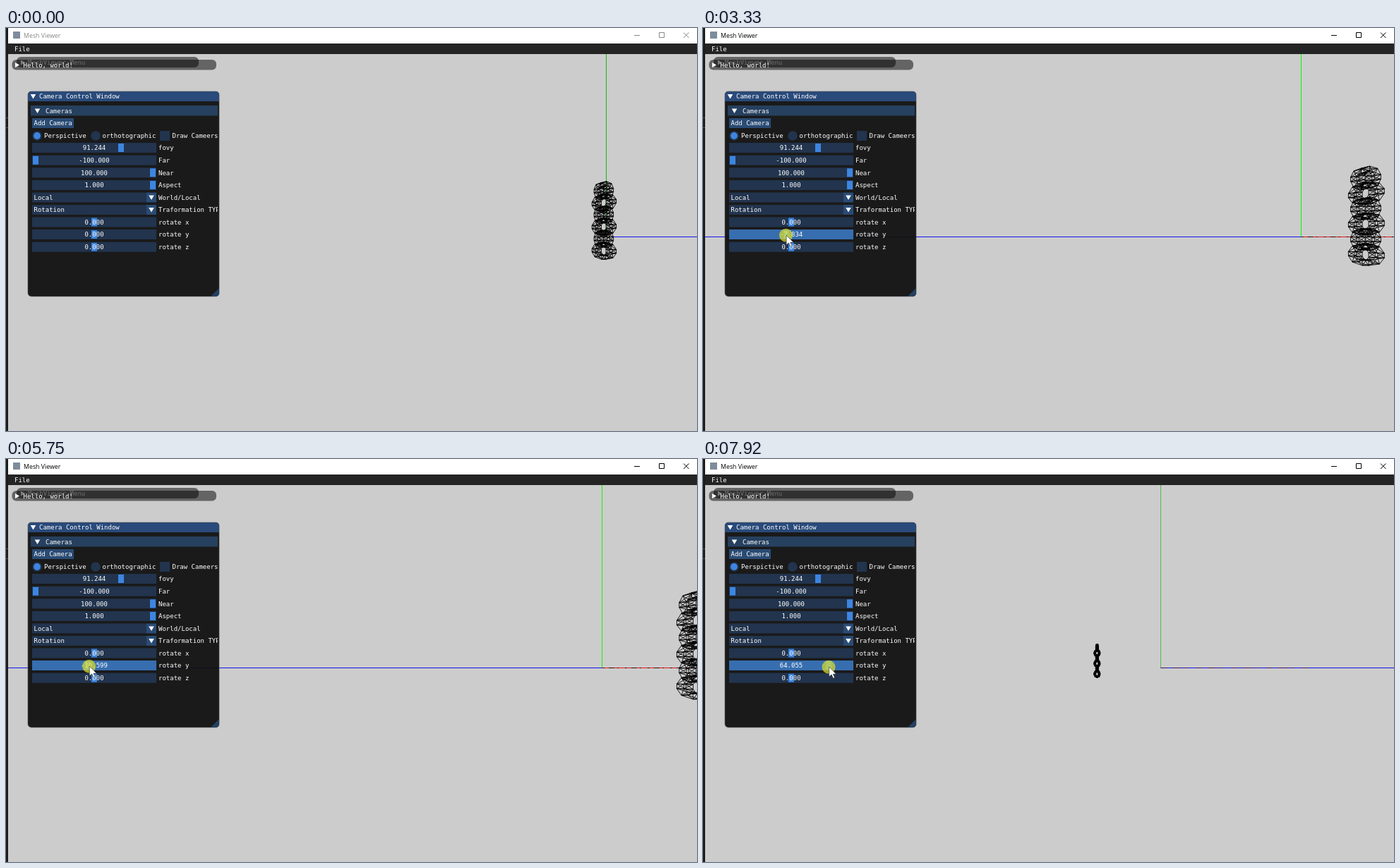
Recreate the animation shown at these times as an HTML page. Size 979 px wide and 572 px high, loop 8 s.

```html
<!DOCTYPE html>
<html lang="en">
<head>
<meta charset="utf-8">
<title>Mesh Viewer</title>
<style>
html, body { margin: 0; height: 100%; overflow: hidden; background: #ccc; }
svg { display: block; width: 979px; height: 572px; }
text { font: 9px "DejaVu Sans Mono", monospace; fill: #fff; }
#title { font: 8.8px "Open Sans", sans-serif; fill: #888; }
#buttons { fill: none; stroke: #888; }
.focus #title { fill: #000; }
.focus #buttons { stroke: #000; }
.mid { text-anchor: middle; }
</style>
</head>
<body>
<svg id="stage" viewBox="0 0 979 572">
  <defs><clipPath id="panel"><rect x="31" y="90" width="269" height="291"/></clipPath></defs>
  <rect width="979" height="572" fill="#ccc"/>
  <g id="scene" fill="none">
    <path id="green"/>
    <path id="blue" stroke="#1414f5"/>
    <path id="red" stroke="#f01414"/>
    <path id="mix"/>
    <path id="mesh" stroke="#000" stroke-width=".9"/>
  </g>
  <rect width="979" height="22" fill="#fff"/>
  <rect y="22" width="979" height="15" fill="#242424"/>
  <rect width="3" height="572" fill="#1c1c1c"/>
  <path d="M0 127.5H3M0 141.5H3" stroke="#555"/>
  <rect x="10" y="5" width="10" height="10" fill="#7f8c9c"/>
  <text id="title" x="25" y="13.5">Mesh Viewer</text>
  <path id="buttons" d="M890 10.5H898M925.5 6.5H932.5V13.5H925.5ZM960 6.5L967.5 14M967.5 6.5L960 14"/>
  <g id="ui"></g>
  <circle id="press" r="9.5" fill="#d8dc28" fill-opacity=".72"/>
  <path id="cursor" d="M0 0V14L3.4 11L5.8 16.2L8 15.2L5.7 10.3H10Z" fill="#fff" stroke="#222" stroke-width=".6"/>
</svg>
<script>
const $ = id => document.getElementById(id);
const FRAME = '#22344e', BUTTON = '#2a4b74', GRAB = '#3d85e0';

// ---- interface ----
let ui = '';
const rect = (x, y, w, h, fill, more = '') =>
  ui += `<rect x="${x}" y="${y}" width="${w}" height="${h}" fill="${fill}" ${more}/>`;
const text = (x, y, s, more = '') => ui += `<text x="${x}" y="${y + 3.2}" ${more}>${s}</text>`;
const path = (d, fill = '#fff') => ui += `<path d="${d}" fill="${fill}"/>`;
const down = (x, y) => path(`M${x - 3.8} ${y - 3}h7.6l-3.8 6.5z`);
const right = (x, y) => path(`M${x - 3} ${y - 3.5}v7l6 -3.5z`);
const label = (y, s) => text(216, y, s, 'clip-path="url(#panel)"');

function slider(y, value, grab, name, id = '') {
  rect(37, y - 7, 176, 14, FRAME, id && `id="${id}Frame"`);
  rect(grab - 4, y - 6, 8, 12, GRAB, id && `id="${id}Grab"`);
  text(125, y, value, `class="mid" ${id && `id="${id}Value"`}`);
  label(y, name);
}
function combo(y, value, name) {
  rect(37, y - 7, 162, 14, FRAME);
  rect(199, y - 7, 14, 14, BUTTON);
  down(206, y);
  text(39.5, y, value);
  label(y, name);
}

text(12, 29.8, 'File');
rect(15, 41, 258, 15, '#000', 'rx="6" fill-opacity=".51"');
right(24, 49);
text(31, 49, 'MeshViewer Menu', 'fill-opacity=".8"');
rect(8.5, 45, 289.5, 14.5, '#000', 'rx="6" fill-opacity=".51"');
right(16, 52.5);
text(24.5, 52.5, 'Hello, world!');

rect(31, 90, 271, 291, '#0f0f0f', 'rx="5" fill-opacity=".94"');
path('M31 104V95Q31 90 36 90H297Q302 90 302 95V104Z', '#294a7a');
rect(31, 90, 271, 291, 'none', 'rx="5" stroke="#50505c" stroke-opacity=".6"');
path('M302 369V376Q302 381 297 381H290Z', '#24405f');
down(38.5, 97);
text(47, 97, 'Camera Control Window');
rect(35, 110, 265, 14.5, '#26405f');
down(44.5, 117.5);
text(56, 117.5, 'Cameras');
rect(37, 128, 59, 14, BUTTON);
text(39.5, 135, 'Add Camera');
ui += `<circle cx="44" cy="153" r="6.8" fill="${FRAME}"/><circle cx="44" cy="153" r="4.9" fill="${GRAB}"/>`;
ui += `<circle cx="127" cy="153" r="6.8" fill="${FRAME}"/>`;
text(54, 153, 'Perspictive');
text(136.5, 153, 'orthotographic');
rect(218, 146, 14, 14, FRAME);
text(235.5, 153, 'Draw Cameers', 'clip-path="url(#panel)"');
slider(170, '91.244', 163, 'fovy');
slider(187.7, '-100.000', 42, 'Far');
slider(205.3, '100.000', 208, 'Near');
slider(223, '1.000', 208, 'Aspect');
combo(240.5, 'Local', 'World/Local');
combo(258, 'Rotation', 'Traformation TYPE');
slider(275.5, '0.000', 125, 'rotate x');
slider(293, '0.000', 125, 'rotate y', 'y');
slider(310.8, '0.000', 125, 'rotate z');
$('ui').innerHTML = ui;

// ---- chain of six links, each a low-poly stadium ring ----
const SEG = 10, SIDES = 4;
const points = [], edges = [];
for (let link = 0; link < 6; link++) {
  const base = points.length;
  for (let a = 0; a < SEG; a++) {
    const upper = a < 5;
    const ang = (upper ? a : a - 1) * Math.PI / 4;
    for (let j = 0; j < SIDES; j++) {
      const tube = (j + .5) * Math.PI / 2;
      const r = 7 + 4 * Math.cos(tube), flat = 4 * Math.sin(tube);
      const across = r * Math.cos(ang);
      const y = -66.5 + 17.3 * link + r * Math.sin(ang) + (upper ? 2.5 : -2.5);
      points.push(link % 2 ? [flat, y, across] : [across, y, flat]);
      const id = (p, q) => base + (p % SEG) * SIDES + q % SIDES;
      edges.push([id(a, j), id(a + 1, j)], [id(a, j), id(a, j + 1)], [id(a, j), id(a + 1, j + 1)]);
    }
  }
}

const CX = 491, CY = 296.5, ORBIT = 360, DEPTH = 1.49 / ORBIT;

function meshPath(sin, cos) {
  const shown = CX + ORBIT * cos / (1 + 1.49 * sin);
  if (shown > 1010) return '';
  const flat = points.map(([x, y, z]) => {
    const k = 1 / (1 + DEPTH * ((ORBIT + x) * sin - z * cos));
    return (CX + ((ORBIT + x) * cos + z * sin) * k).toFixed(1) + ' ' + (CY + y * k).toFixed(1);
  });
  return edges.map(([a, b]) => `M${flat[a]}L${flat[b]}`).join('');
}

// ---- motion: time and dragged angle ----
const DRAG = [
  [1470, -3.2], [2489, -3.2], [2490, -4.15], [2869, -4.15], [2870, -5.07], [3150, -5.07],
  [3890, -15.2], [3930, -16.1], [3970, -16.1], [4770, -30], [5100, -36.4], [5200, -36.4],
  [5580, -18.9], [5620, -18], [5750, -10.6], [6350, 13.36], [6430, 15.2], [7180, 45.62],
  [7210, 47.5], [7260, 49.3], [7670, 63.1], [7889, 63.1], [7890, 64.05]
];
const STEP = .921659;

function dragAt(t) {
  const i = DRAG.findIndex(k => k[0] > t);
  if (i === 0) return DRAG[0][1];
  if (i < 0) return DRAG[DRAG.length - 1][1];
  const [t0, v0] = DRAG[i - 1], [t1, v1] = DRAG[i];
  return v0 + (v1 - v0) * (t - t0) / (t1 - t0);
}
const knobX = v => 124.5 + .836 * v;

function set(id, attrs) {
  for (const name in attrs) $(id).setAttribute(name, attrs[name]);
}

function drawAxes(v, focus) {
  const ox = CX + ORBIT * Math.cos(v * Math.PI / 180);
  const behind = v < 0;
  set('green', {
    d: `M${Math.floor(ox) + .5} 37V${CY}`,
    stroke: !focus ? '#12b812' : v > 25 ? '#52bd52' : v > 0 ? '#28dc28' : '#0f0'
  });
  set('blue', { d: behind ? `M3 ${CY}H${ox}` : `M${ox} ${CY}H979` });
  set('red', { d: behind ? `M${ox} ${CY}H979` : '' });
  const mixed = behind ? (v < -6 ? `M${ox} ${CY}H979` : '') : `M${ox} ${CY}H858`;
  set('mix', {
    d: mixed,
    stroke: behind ? '#300808' : '#401060',
    'stroke-dasharray': behind ? '3 6 8 4 2 9' : '9 7 14 4 5 11'
  });
}

function drawCursor(t, pressed) {
  let x = 122.3, y = 292.5;
  if (pressed) {
    x = knobX(dragAt(t + 60));
    y = 294 + Math.max(0, Math.min(1, (t - 6400) / 700));
  } else if (t < 1170) {
    const p = Math.min(1, Math.max(0, (t - 230) / 780));
    const rest = (1 - p) ** 2;
    x = 123.3 + 787 * rest - (t > 1040 ? (t - 1040) / 130 : 0);
    y = 292.5 + 290 * rest ** 2 - 70 * rest * (1 - rest);
  }
  set('cursor', { transform: `translate(${x + (pressed ? .6 : 0)} ${y})`, visibility: t < 230 ? 'hidden' : 'visible' });
  set('press', { cx: x, cy: y + .3, visibility: pressed ? 'visible' : 'hidden' });
}

function draw(t) {
  const focus = t >= 1420, dragging = t >= 1470;
  const snapped = (Math.round(dragAt(t) / STEP - .5) + .5) * STEP;
  const angle = dragging ? snapped : STEP / 2;
  const rad = angle * Math.PI / 180;
  $('stage').classList.toggle('focus', focus);
  drawAxes(angle, focus);
  set('mesh', { d: meshPath(Math.sin(rad), Math.cos(rad)) });
  set('yFrame', { fill: dragging ? '#376eb0' : FRAME });
  set('yGrab', { x: (dragging ? knobX(snapped) : 125) - 4, fill: dragging ? '#4296fa' : GRAB });
  $('yValue').textContent = dragging ? snapped.toFixed(3) : '0.000';
  drawCursor(t, focus);
}

const start = performance.now();
function tick() {
  draw((performance.now() - start) % 8000);
  requestAnimationFrame(tick);
}
tick();
</script>
</body>
</html>
```
